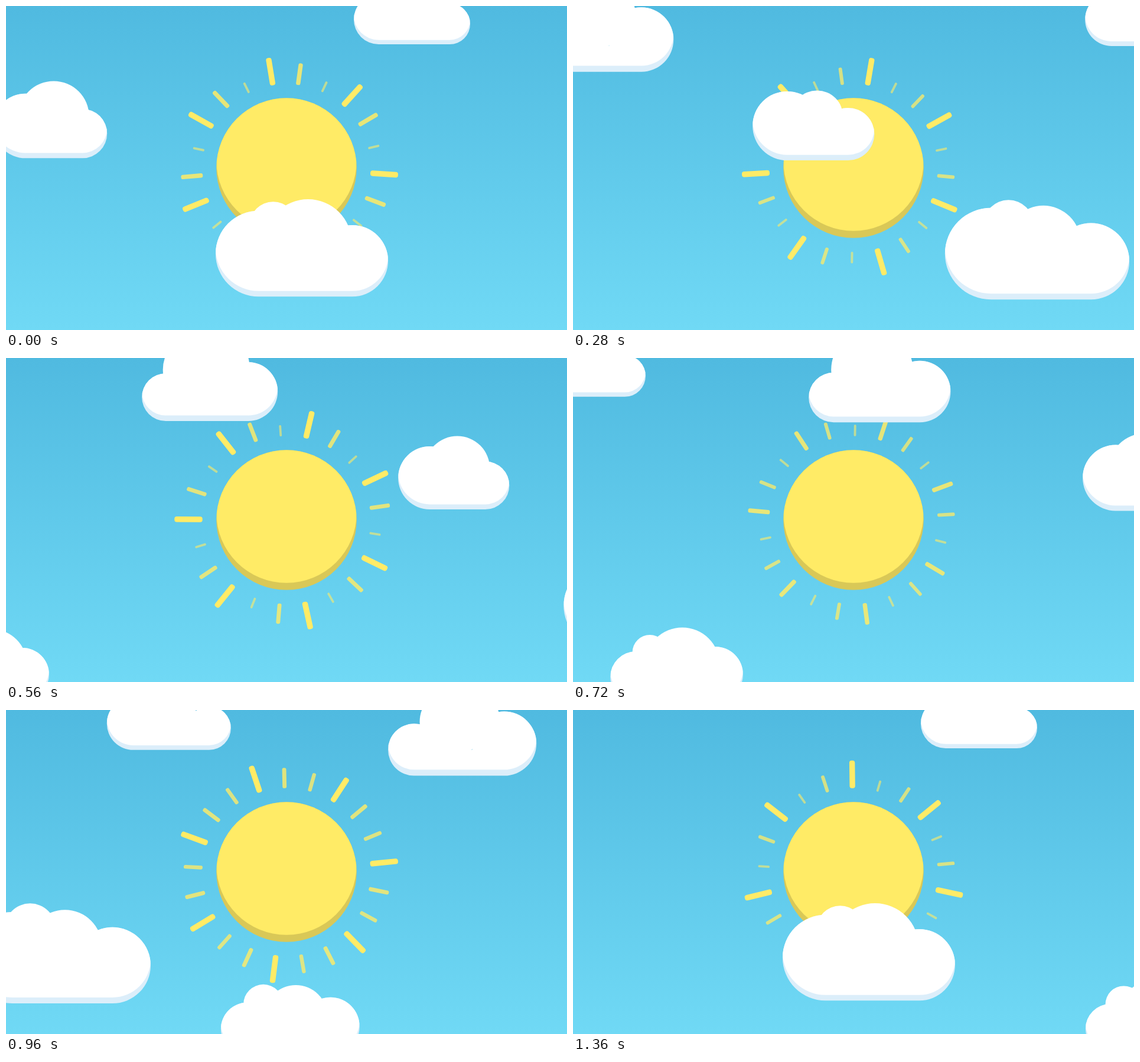
Animation of 950 by 550 pixels, one loop 1.38 s. Source, as an HTML page with a canvas:

```html
<!DOCTYPE html>
<html lang="en">
<head>
<meta charset="utf-8">
<title>Sunny sky</title>
<style>
html, body { margin: 0; width: 950px; height: 550px; overflow: hidden; }
canvas { display: block; }
</style>
</head>
<body>
<canvas id="stage" width="950" height="550"></canvas>
<script>
const ctx = document.getElementById('stage').getContext('2d');
const TAU = Math.PI * 2;
const LOOP = 1380;
const YELLOW = '#ffeb66';

// x: start centre, v: speed per tick, left/right: radii of the end circles,
// bumps: [dx, dy, radius, pulse size, tick of the largest size]
const clouds = [
  { x: 501, y: 420.5, v: 15.833, span: 1425, w: 285, left: 71, right: 59.2, shade: 9.2,
    bumps: [[-48.5, -48.5, 43.4, 7.1, 30], [10.5, -18.5, 68, 6, 0]] },
  { x: 687.5, y: 23, v: 15.833, span: 1425, w: 192.3, left: 41, right: 33.8, shade: 7.2,
    bumps: [[0, -24, 50, 5, 0]] },
  { x: -240.7, y: 57, v: 15.833, span: 1425, w: 230, left: 40.4, right: 50, shade: 9.4,
    bumps: [[-15.4, -37, 61.6, 5.6, 0], [20, -45, 42.2, 8.4, 30]] },
  { x: 74.75, y: 203.5, v: 18.472, span: 2500, w: 188.2, left: 53.5, right: 40.7, shade: 8.6,
    bumps: [[6, -16, 51.2, 8.8, 0]] },
  { x: -741.6, y: 537, v: 19.108, span: 2500, w: 215, left: 41, right: 45, shade: 8,
    bumps: [[-45.5, -37.5, 33.5, 5, 30], [9.5, -16.4, 58.3, 5.3, 0]] }
];

const wave = (tick, peak, period) => Math.cos(TAU * (tick - peak) / period);

function addCircle(path, x, y, r) {
  path.moveTo(x + r, y);
  path.arc(x, y, r, 0, TAU);
}

// Fills a path with an inner shadow along its lower edge
function fillShaded(path, light, dark, depth) {
  ctx.save();
  ctx.fillStyle = dark;
  ctx.fill(path);
  ctx.clip(path);
  ctx.translate(0, -depth);
  ctx.fillStyle = light;
  ctx.fill(path);
  ctx.restore();
}

function drawSky() {
  const sky = ctx.createLinearGradient(0, 0, 0, 550);
  sky.addColorStop(0, '#50bae0');
  sky.addColorStop(1, '#70d9f5');
  ctx.fillStyle = sky;
  ctx.fillRect(0, 0, 950, 550);
}

function drawSun(tick) {
  const peaks = [1.5, 28.5, 19.5];
  ctx.fillStyle = YELLOW;
  for (let i = 0; i < 21; i++) {
    const pulse = (1 + wave(tick, peaks[i % 3], 36)) / 2;
    const scale = 0.4 + 0.6 * pulse;
    ctx.save();
    ctx.globalAlpha = 0.6 + 0.4 * pulse;
    ctx.translate(475, 275);
    ctx.rotate((3.55 + i * 360 / 21 + 2 * tick) * TAU / 360);
    ctx.translate(142.3, 0);
    ctx.scale(scale, scale);
    ctx.beginPath();
    ctx.roundRect(0, -4.75, 47.5, 9.5, 4);
    ctx.fill();
    ctx.restore();
  }
  const disc = new Path2D();
  addCircle(disc, 475, 275, 118.75);
  fillShaded(disc, YELLOW, '#d9c857', 12);
}

function drawCloud(cloud, tick) {
  const { x, y, v, span, w, left, right, shade, bumps } = cloud;
  const edge = 160;
  const cx = (x + v * tick + edge + span) % span - edge;
  const s = 1.05 + 0.05 * wave(tick, 15, 45);
  const bottom = y + Math.max(left, right) * s;
  const x1 = cx + (left - w / 2) * s;
  const x2 = cx + (w / 2 - right) * s;
  const barHeight = Math.min(left, right) * s;

  const base = new Path2D();
  addCircle(base, x1, bottom - left * s, left * s);
  addCircle(base, x2, bottom - right * s, right * s);
  base.rect(x1, bottom - barHeight, x2 - x1, barHeight);
  fillShaded(base, '#fff', '#dceefa', shade * s);

  const puffs = new Path2D();
  for (const [dx, dy, r, size, peak] of bumps)
    addCircle(puffs, cx + dx, y + dy, r + size * wave(tick, peak, 45));
  ctx.fillStyle = '#fff';
  ctx.fill(puffs);
}

const start = performance.now();

function render() {
  // The motion steps every 20 ms, four ticks per three steps
  const step = Math.floor((performance.now() - start) % LOOP / 20);
  const tick = Math.floor(step * 4 / 3);
  drawSky();
  drawSun(tick);
  for (const cloud of clouds) drawCloud(cloud, tick);
  requestAnimationFrame(render);
}
render();
</script>
</body>
</html>
```
